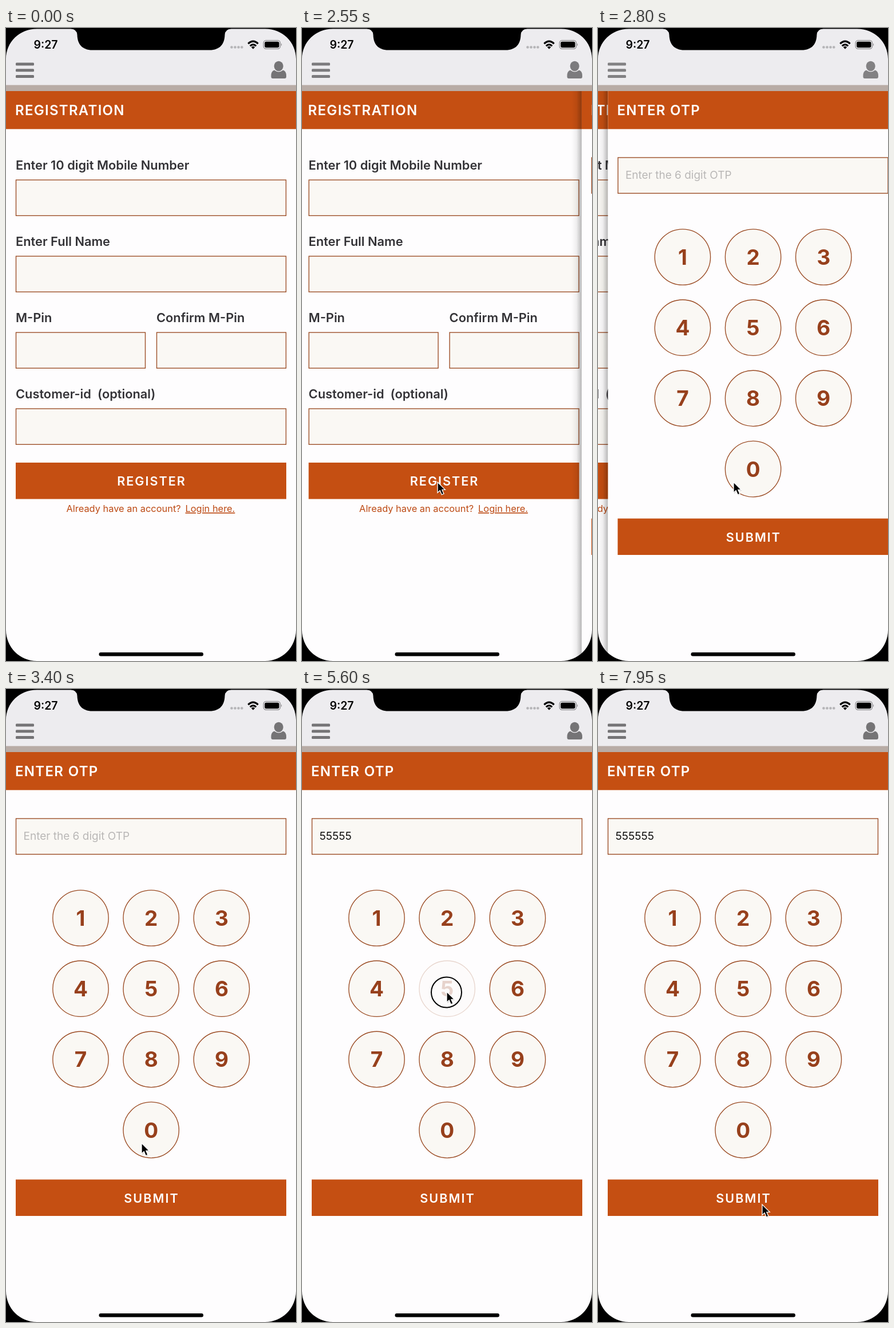
An HTML page that plays this animation: 507x1104 px, repeating every 8 s.

```html
<!DOCTYPE html>
<html lang="en">
<head>
<meta charset="utf-8">
<title>Registration and OTP</title>
<style>
  html, body { margin: 0; width: 100%; height: 100%; overflow: hidden; background: #000; }
  svg { display: block; width: 100vw; height: 100vh; }
  text { font-family: Inter, Roboto, sans-serif; }
  .title { font-size: 24px; font-weight: 600; letter-spacing: 1.3px; fill: #fff; }
  .label { font-size: 21.8px; font-weight: 600; fill: #333236; }
  .action { font-size: 21.6px; font-weight: 600; letter-spacing: 2px; fill: #fff; text-anchor: middle; }
  .link { font-size: 16.4px; fill: #bd4a14; }
  .entry { font-size: 19px; }
  .digit { font-size: 37px; font-weight: 700; fill: #97401c; text-anchor: middle; }
  .time { font-size: 19.5px; font-weight: 600; }
  .box { fill: #faf8f4; stroke: #9a4a22; stroke-width: 1.35px; }
  .paper { fill: #fefdfe; }
  .brand { fill: #c54f12; }
</style>
</head>
<body>
<svg viewBox="0 0 507 1104">
  <defs>
    <linearGradient id="shade">
      <stop offset="0" stop-opacity="0"/>
      <stop offset=".5" stop-opacity=".06"/>
      <stop offset="1" stop-opacity=".28"/>
    </linearGradient>
  </defs>

  <g id="form"></g>
  <g id="otp"></g>

  <rect width="507" height="100" fill="#edecef"/>
  <rect y="99.5" width="507" height="10.5" fill="#b8aca5"/>
  <g id="icons" fill="#757476">
    <rect x="17" y="60.5" width="32" height="5" rx="1.5"/>
    <rect x="17" y="71.3" width="32" height="5" rx="1.5"/>
    <rect x="17" y="82" width="32" height="5" rx="1.5"/>
    <ellipse cx="476.7" cy="66.5" rx="8" ry="8.8"/>
    <path d="M469 73.5Q476.700 79.500 484.500 73.500Q490 75.500 490 83V85Q490 88 487 88H466.500Q463.500 88 463.500 85V83Q463.500 75.500 469 73.500Z"/>
  </g>

  <text class="time" x="48.500" y="36">9:27</text>
  <g fill="#b5b4b7">
    <circle cx="394.500" cy="33.500" r="2.300"/><circle cx="400.500" cy="33.500" r="2.300"/>
    <circle cx="406.500" cy="33.500" r="2.300"/><circle cx="412.300" cy="33.500" r="2.300"/>
  </g>
  <g fill="none" stroke="#000" stroke-width="3">
    <path d="M423.300 27.300Q432 19 440.700 27.300"/>
    <path d="M426.700 31.300Q432 26.300 437.300 31.300"/>
  </g>
  <path d="M428.800 33.400Q432 30.800 435.200 33.400L432 36.800Z"/>
  <rect x="450.200" y="21.700" width="29.300" height="14.600" rx="4.500" fill="none" stroke="#8b8a8d" stroke-width="1.300"/>
  <rect x="452.200" y="23.700" width="25.300" height="10.600" rx="2.700"/>
  <path d="M481 26.500Q483.300 29 481 31.500Z" fill="#8b8a8d"/>

  <path fill-rule="evenodd" d="M0 0H507V1104H0Z M0 54V1050C0 1080 24 1104 54 1104H453C483 1104 507 1080 507 1050V54C507 24 483 1.500 453 1.500H394Q383 2 382.500 12C382 28 374 38.500 356 38.500H151C133 38.500 125 28 124.500 12Q124 2 113 1.500H54C24 1.500 0 24 0 54Z"/>
  <rect x="162.500" y="1089" width="182.500" height="6.500" rx="3.250"/>

  <g id="pointer">
    <circle id="ring" cx="-.5" cy="1" r="26.500" fill="none" stroke="#000" stroke-width="2"/>
    <path d="M1 2V20L5.200 16L8.200 23L11.700 21.500L8.700 14.700H14.500Z" opacity=".2"/>
    <path d="M0 0V18.500L4.200 14.700L7.300 22L11 20.400L7.900 13.300H13.300Z" stroke="#fff" stroke-width="1.300"/>
  </g>
</svg>
<script>
const LOOP = 8000, STEP = 50, WIDTH = 507;
const $ = id => document.getElementById(id);

const text = (kind, x, y, words, extra = '') =>
  `<text class="${kind}" x="${x}" y="${y}" ${extra}>${words}</text>`;
const field = (x, y, width) =>
  `<rect class="box" x="${x}" y="${y}" width="${width}" height="62.300"/>`;
const page = title =>
  `<rect class="paper" y="100" width="507" height="1004"/>
   <rect class="brand" y="110" width="507" height="66.300"/>${text('title', 16, 152, title)}`;
const button = (id, y, words) =>
  `<g id="${id}"><rect class="brand" x="17" y="${y}" width="473" height="63.500"/>
   ${text('action', 254.5, y + 40, words)}</g>`;
const key = n => {
  const place = n ? n - 1 : 10;
  const x = 130.5 + place % 3 * 123.2, y = 399.5 + Math.floor(place / 3) * 123.2;
  return `<g id="key${n}"><circle class="box" cx="${x}" cy="${y}" r="48.700"/>
    ${text('digit', x, y + 13.5, n)}</g>`;
};

$('form').innerHTML = page('REGISTRATION')
  + text('label', 17, 247, 'Enter 10 digit Mobile Number') + field(17.5, 265, 472)
  + text('label', 17, 380, 'Enter Full Name') + field(17.5, 398, 472)
  + text('label', 17, 513, 'M-Pin') + field(17.5, 531, 226)
  + text('label', 263, 513, 'Confirm M-Pin') + field(263.5, 531, 226)
  + text('label', 17, 646, 'Customer-id\u00a0 (optional)') + field(17.5, 664, 472)
  + button('register', 758, 'REGISTER')
  + text('link', 105.5, 844, 'Already have an account?')
  + text('link', 313.5, 844, 'Login here.', 'text-decoration="underline"');

$('otp').innerHTML = '<rect x="-18" y="100" width="18" height="1004" fill="url(#shade)"/>'
  + page('ENTER OTP') + field(17.5, 226, 472)
  + text('entry', 30.5, 263, '', 'id="entry"')
  + Array.from({ length: 10 }, (_, n) => key(n)).join('')
  + button('submit', 855.5, 'SUBMIT');

// [press, release] times
const registerTaps = [[2180, 2290]];
const keyTaps = Array.from({ length: 10 }, (_, i) => [3995 + i * 295, 4165 + i * 295]);
const allTaps = [...registerTaps, ...keyTaps];

// [time, x, y] of the pointer tip
const route = [
  [1950, 300, 1104], [2150, 237, 792], [3450, 237, 792], [3950, 253, 528],
  [7050, 253, 528], [7700, 296, 955], [7950, 287, 899]
];

const ease = u => u < .5 ? 2 * u * u : 1 - 2 * (1 - u) ** 2;
const mix = (a, b, u) => a + (b - a) * u;

function touchOpacity(t, taps) {
  const fades = taps.flatMap(([down, up]) => [[down, .2, 150], [up, 1, 250]]);
  return fades.reduce((value, [start, goal, length], i) => {
    if (t < start) return value;
    const end = Math.min(t, fades[i + 1]?.[0] ?? t);
    return mix(value, goal, ease(Math.min(1, (end - start) / length)));
  }, 1);
}

function slide(t) {
  const w = Math.max(0, t - 2535) * .0196;
  return w > 10 ? 1 : 1 - (1 + w) * Math.exp(-w);
}

function pointerAt(t) {
  const next = route.findIndex(stop => stop[0] > t);
  if (next < 0) return route.at(-1).slice(1);
  const [t0, x0, y0] = route[next - 1], [t1, x1, y1] = route[next];
  const u = ease((t - t0) / (t1 - t0));
  return [mix(x0, x1, u), mix(y0, y1, u)];
}

function render(t) {
  const p = slide(t);
  $('form').setAttribute('transform', `translate(${-.3 * WIDTH * p})`);
  $('otp').setAttribute('transform', `translate(${WIDTH * (1 - p)})`);
  $('otp').style.display = p ? '' : 'none';
  const blend = Math.min(1, Math.max(0, (t - 2500) / 400));
  $('icons').style.opacity = 1 - .6 * blend * (1 - blend);

  $('register').style.opacity = touchOpacity(t, registerTaps);
  $('key5').style.opacity = touchOpacity(t, keyTaps);

  const typed = Math.min(6, keyTaps.filter(tap => tap[1] <= t).length);
  $('entry').textContent = typed ? '5'.repeat(typed) : 'Enter the 6 digit OTP';
  $('entry').style.fill = typed ? '#111' : '#b9b7b6';

  const shown = t >= route[0][0];
  $('pointer').style.display = shown ? '' : 'none';
  if (shown) $('pointer').setAttribute('transform', `translate(${pointerAt(t)})`);
  $('ring').style.display = allTaps.some(([down, up]) => down <= t && t < up) ? '' : 'none';
}

const started = performance.now();
function tick() {
  const t = (performance.now() - started) % LOOP;
  render(Math.floor(t / STEP) * STEP);
  requestAnimationFrame(tick);
}
tick();
</script>
</body>
</html>
```
